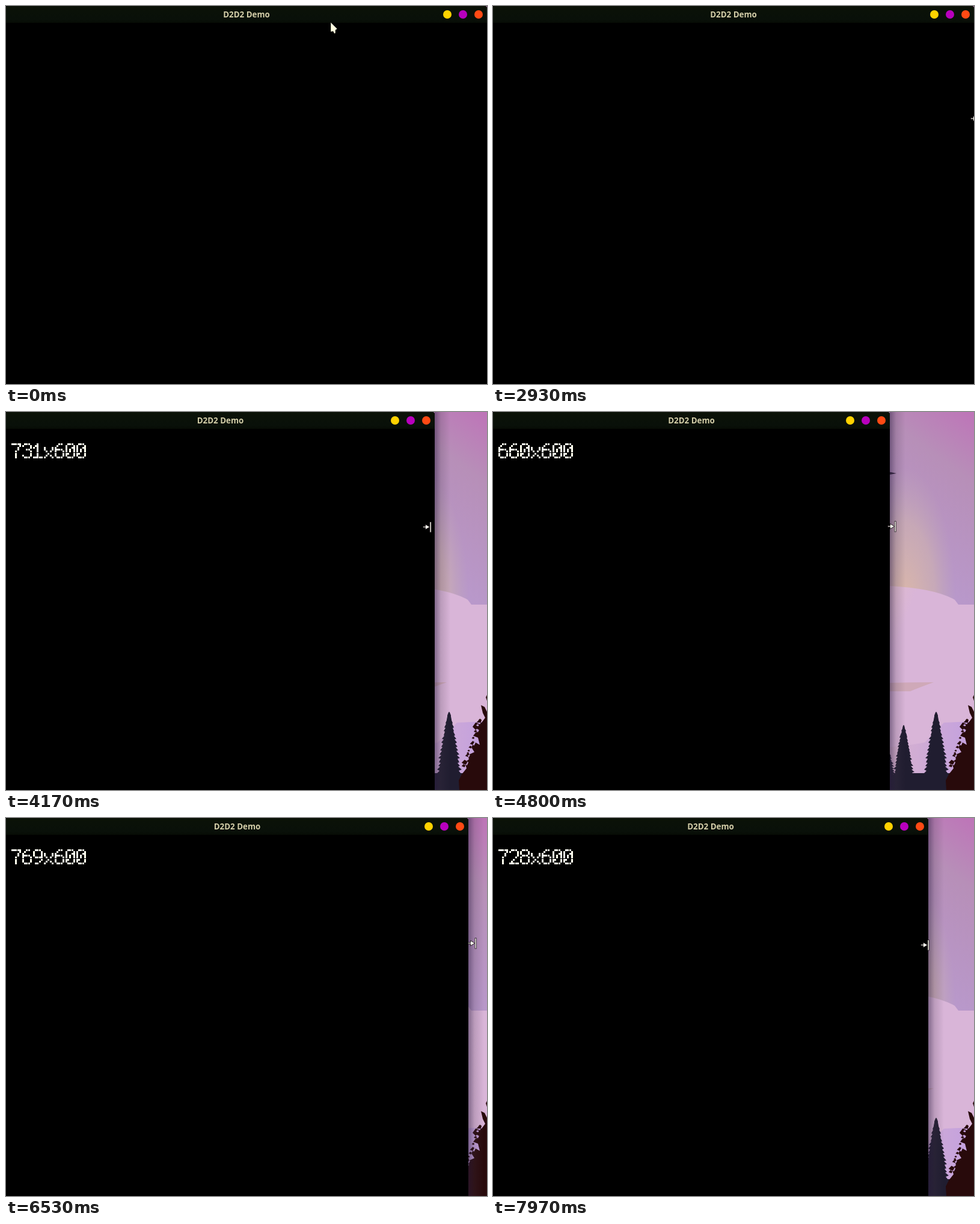
Recreate the animation shown at these times as an HTML page. Size 800 by 628 pixels, loop 8000 ms.

```html
<!DOCTYPE html>
<html lang="en">
<head>
<meta charset="utf-8">
<title>D2D2 Demo</title>
<style>
html, body { margin: 0; width: 100%; height: 100%; overflow: hidden; background: #000; }
#stage { position: relative; width: 800px; height: 628px; overflow: hidden; }
#stage > svg { position: absolute; left: 0; top: 0; }
#shadow { position: absolute; top: 0; width: 26px; height: 628px;
  background: linear-gradient(90deg, rgba(45,30,65,.5), rgba(70,55,75,.2) 40%, transparent); }
#window { position: absolute; left: 0; top: 0; height: 628px; background: #000;
  border-radius: 4px 4px 0 0; overflow: hidden; }
#bar { position: relative; height: 28px; background: linear-gradient(#0b1207, #091009 80%, #070c05);
  color: #d3cda8; font: bold 13.33px/28px "Noto Sans", "Open Sans", sans-serif;
  text-align: center; white-space: nowrap; }
#bar i { position: absolute; top: 7px; width: 14px; height: 14px; border-radius: 50%; }
</style>
</head>
<body>
<div id="stage">
  <svg width="800" height="628">
    <defs>
      <linearGradient id="sky" x1="1" y1="0" x2=".55" y2="1">
        <stop offset="0" stop-color="#be74b8"/>
        <stop offset=".3" stop-color="#b78fb8"/>
        <stop offset="1" stop-color="#b99bd0"/>
      </linearGradient>
      <radialGradient id="glow">
        <stop offset="0" stop-color="#dcb8a8"/>
        <stop offset=".6" stop-color="#cdb0b0" stop-opacity=".7"/>
        <stop offset="1" stop-color="#c0a8b4" stop-opacity="0"/>
      </radialGradient>
      <linearGradient id="cloud" gradientUnits="userSpaceOnUse" x1="650" y1="0" x2="800" y2="60">
        <stop offset="0" stop-color="#e2bcc2"/>
        <stop offset=".25" stop-color="#e5ccb8"/>
        <stop offset=".55" stop-color="#e2bdc6"/>
        <stop offset="1" stop-color="#d9b5d8"/>
      </linearGradient>
      <linearGradient id="haze" x1="0" x2="1">
        <stop offset="0" stop-color="#dfbac8"/>
        <stop offset="1" stop-color="#c3a0df"/>
      </linearGradient>
    </defs>
    <rect x="600" width="200" height="330" fill="url(#sky)"/>
    <ellipse cx="684" cy="320" rx="86" ry="228" fill="url(#glow)"/>
    <path d="M600 289H660Q735 293 768 312L774 320H800V628H600Z" fill="url(#cloud)"/>
    <path d="M600 452Q670 449 733 449Q708 458 694 464H600Z" fill="#cfa9b8"/>
    <path d="M600 562Q690 555 718 549L750 516 800 514V628H600Z" fill="url(#haze)"/>
    <path d="M650 99L662 100 671 102 660 104Z" fill="#32233c"/>
    <g fill="#201d30">
      <path id="spruces"/>
      <path d="M600 605H662L668 600H760L768 591 786 602V628H600Z"/>
    </g>
    <path id="foliage" fill="#280a0b"/>
  </svg>
  <div id="shadow"></div>
  <div id="window">
    <div id="bar">D2D2 Demo
      <i style="right:59px;background:#ffd200"></i>
      <i style="right:33px;background:#b800bd"></i>
      <i style="right:7px;background:#ff4a14"></i>
    </div>
  </div>
  <svg width="800" height="628">
    <path id="label" fill="#fffff0" shape-rendering="crispEdges" role="img"/>
    <path id="pointer" d="M0 0L11 11 8 13V18L6 19 4 15 0 16Z" fill="#fffde0" stroke="#000" stroke-width=".5"/>
    <g id="resizer" fill="#fffff0" stroke="#201820" stroke-width="1.6" paint-order="stroke">
      <path d="M-12-.6H-8V-3.5L-2 0-8 3.5V.6H-12Z"/>
      <rect x="-.6" y="-8" width="1.4" height="16.5"/>
    </g>
  </svg>
</div>
<script>
const $ = id => document.getElementById(id);
const LOOP = 8000, DRAG = 3430, GRAB = 2930;

// time, x, y
const pointerPath = [
  [0, 540, 26.5], [400, 625, 118], [840, 708, 17],
  [1240, 752, 92], [1660, 774, 165], [2300, 794, 185]
];
// time, window width, cursor x, cursor y, displayed width
const dragPath = [
  [GRAB, 800, 807, 187, 799], [3000, 800, 807, 191, 799],
  [DRAG, 800, 807, 191, 799], [3800, 777, 778, 191, 783],
  [4170, 713, 706, 191, 731], [4580, 652, 656, 190, 654],
  [4800, 660, 669, 190, 660], [5130, 722, 732, 196, 720],
  [5480, 668, 678, 201, 669], [5770, 709, 733, 204, 700],
  [6000, 775, 784, 206, 773], [6270, 738, 745, 207, 738],
  [6530, 769, 781, 208, 769], [6880, 718, 723, 209, 720],
  [7350, 770, 779, 210, 769], [7970, 724, 724, 211, 728]
];

// Smooth curve through the rows, one value per column.
function follow(rows, t) {
  const last = rows.length - 1;
  t = Math.min(Math.max(t, rows[0][0]), rows[last][0]);
  const i = Math.min(last - 1, rows.filter(r => r[0] <= t).length - 1);
  const a = rows[i], b = rows[i + 1], span = b[0] - a[0], u = (t - a[0]) / span;
  const slope = (k, c) => k < 1 || k >= last ? 0
    : (rows[k + 1][c] - rows[k - 1][c]) / (rows[k + 1][0] - rows[k - 1][0]);
  return a.map((v, c) => {
    const ease = u * u * (3 - 2 * u);
    return v + (b[c] - v) * ease
      + span * u * (1 - u) * ((1 - u) * slope(i, c) - u * slope(i + 1, c));
  });
}

// Pixel glyph strokes: column and row pairs on a 5 by 8 grid.
const glyphs = {
  0: "10 30 41 46 37 17 06 01 10/15 32", 1: "02 20 27/07 47",
  2: "01 10 30 41 43 07 47", 3: "01 10 30 41 42 33 23/33 44 46 37 17 06",
  4: "37 30 05 45", 5: "40 00 03 33 44 46 37 17 06",
  6: "30 20 02 06 17 37 46 44 33 03", 7: "00 40 41 24 27",
  8: "10 30 41 42 33 13 02 01 10/13 04 06 17 37 46 44 33",
  9: "17 27 45 41 30 10 01 03 14 44", x: "02 03 47/42 43 07"
};

function glyphCells(strokes) {
  const cells = new Set();
  for (const stroke of strokes.split("/")) {
    const points = stroke.split(" ").map(p => [+p[0], +p[1]]);
    points.slice(1).forEach(([x, y], i) => {
      const [px, py] = points[i], n = Math.max(Math.abs(x - px), Math.abs(y - py));
      for (let k = 0; k <= n; k++)
        cells.add(Math.round(px + (x - px) * k / n) + "," + Math.round(py + (y - py) * k / n));
    });
  }
  return [...cells].map(c => c.split(",").map(Number));
}
const cells = Object.fromEntries(Object.entries(glyphs).map(([k, s]) => [k, glyphCells(s)]));

function pixelText(text, left, top) {
  return [...text].map((ch, i) => cells[ch].map(([cx, cy]) =>
    `M${left + i * 18 + Math.round(cx * 3.2)} ${top + Math.round(cy * 3.1)}h3v3h-3z`
  ).join("")).join("");
}

let seed = 7;
const random = () => (seed = seed * 16807 % 2147483647) / 2147483647;

function spruce(x, top, half, height) {
  const side = dir => Array.from({ length: 34 }, (_, i) => {
    const f = i / 33, reach = half * f ** .75 * (i % 2 ? .8 : .9 + random() * .2);
    return [x + dir * reach, top + f * height + (i % 2 ? 0 : 2)];
  });
  return "M" + [...side(-1), ...side(1).reverse()].map(p => p.map(Math.round).join(" ")).join("L") + "Z";
}

function foliage() {
  let d = "M800 470L798 474 800 480ZM800 498L796 490 790 487 793 500 797 508 791 516 781 516 776 523 " +
    "783 530 777 538 785 541 788 553 779 548 774 557 779 565 768 570 770 577 763 582 766 592 " +
    "758 602 753 612 754 628H800Z";
  for (let i = 0; i < 16; i++) {
    const f = random(), x = 790 - f * 28 - random() * 3, y = 512 + f * 80, r = 2 + random() * 3;
    d += `M${x - r} ${y}l${r} ${-r} ${r} ${r * .6} ${-r * .5} ${r}z`;
  }
  return d;
}

$("spruces").setAttribute("d",
  spruce(737, 496, 21, 106) + spruce(683, 518, 18, 86) + spruce(653, 540, 17, 70));
$("foliage").setAttribute("d", foliage());

const place = (id, x, y, shown) => {
  $(id).setAttribute("transform", `translate(${Math.round(x)} ${Math.round(y)})`);
  $(id).style.display = shown ? "" : "none";
};

function draw(t) {
  const [, px, py] = follow(pointerPath, t);
  const [, edge, x, y, shownWidth] = follow(dragPath, t);
  const width = Math.min(800, Math.round(edge));
  place("pointer", px, py, t < GRAB);
  place("resizer", x, y, t >= GRAB);
  $("window").style.width = width + "px";
  $("shadow").style.left = width + "px";
  const text = Math.min(799, Math.round(shownWidth)) + "x600";
  $("label").setAttribute("d", t < DRAG ? "" : pixelText(text, 9, 52));
  $("label").setAttribute("aria-label", t < DRAG ? "" : text);
}

const start = performance.now();
function tick() {
  draw((performance.now() - start) % LOOP);
  requestAnimationFrame(tick);
}
tick();
</script>
</body>
</html>
```
